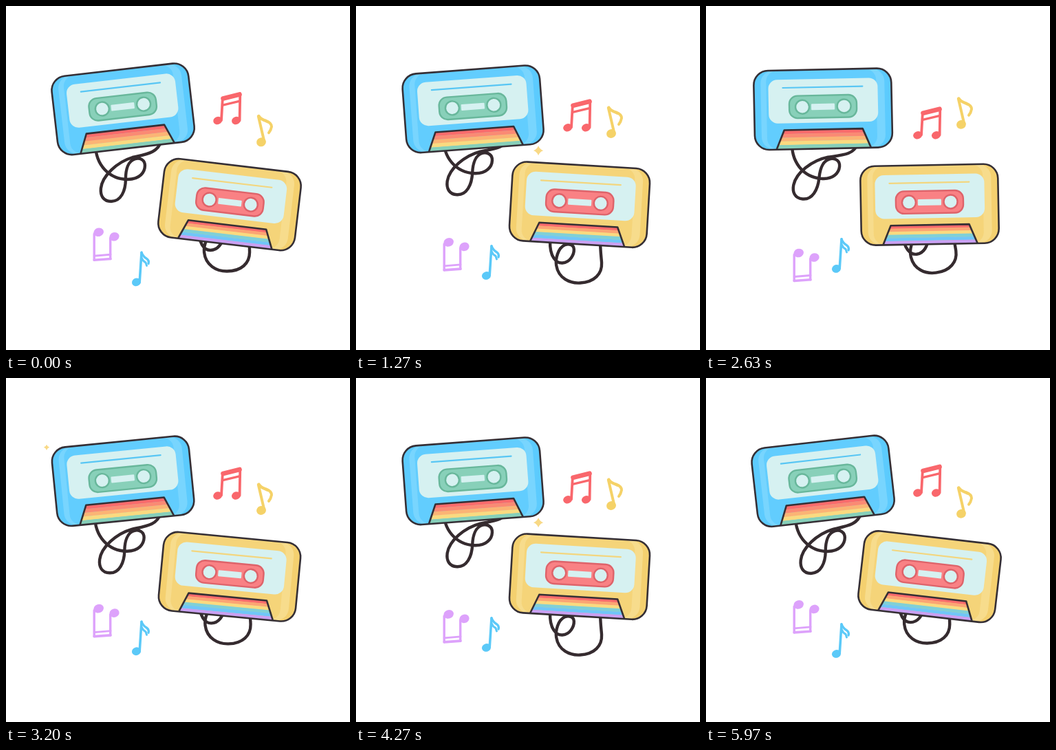
Write an HTML page that moves like this. It is 500x500 px and loops after 6010 ms.

```html
<!DOCTYPE html>
<html lang="en">
<head>
<meta charset="utf-8">
<title>Cassettes</title>
<style>
  html, body { margin: 0; width: 100%; height: 100%; overflow: hidden; background: #fff; }
  svg { display: block; width: 100vw; height: 100vh; }
  .tape { fill: none; stroke: #352b2f; stroke-width: 4.4; stroke-linecap: round; stroke-linejoin: round; }
  .edge { fill: none; stroke: #352f35; stroke-width: 2.6; stroke-linejoin: round; }
  .note { fill: none; stroke-linecap: round; stroke-linejoin: round; }
</style>
</head>
<body>
<svg viewBox="0 0 500 500">
  <g id="decks"></g>
  <g id="notes"></g>
  <g id="stars"></g>
</svg>
<script>
const LOOP = 6010, CYCLE = 3000, SWAY = 1500;
const $ = id => document.getElementById(id);

function add(parent, tag, attrs) {
  const el = document.createElementNS('http://www.w3.org/2000/svg', tag);
  for (const k in attrs) el.setAttribute(k, attrs[k]);
  parent.appendChild(el);
  return el;
}

const box = (g, x, y, width, height, rx, style) =>
  add(g, 'rect', { x, y, width, height, rx, ...style });

const decks = [
  {
    x: 170.1, y: 149.8, rest: -6.6, swing: 9.4, pull: -9.5,
    shell: '#5ccbfe', body: '#62cdfe', glow: '#78d5fe', line: '#58c6f4',
    reel: '#88d0b9', rim: '#68b79b',
    stripes: ['#f96b6c', '#fa8a74', '#fbb475', '#fada80', '#86cfb9'],
    tape: 'M130 200C130 232 151 252 177 252C195 252 202 241 202 232C202 224 195 220 188 222' +
      'C177 225 174 239 174 251C174 269 167 284 153 284C141 284 137 275 138 265' +
      'C140 247 161 227 184 220C205 215 221 213 225 197'
  },
  {
    x: 325, y: 288.7, rest: 6.8, swing: -13.7, pull: 18,
    shell: '#f4d06f', body: '#f5d479', glow: '#f7dc8c', line: '#f3d67e',
    reel: '#f98184', rim: '#de636a',
    stripes: ['#f96b6c', '#fba574', '#fada80', '#80d0d6', '#70c6f8', '#c9a0f2'],
    tape: 'M281 322C279 345 288 355 297 355C308 355 315 344 315 336C315 329 308 327 302 329' +
      'C292 333 287 348 288 358C290 377 306 385.5 321 385.5C342 385.5 354 374 354 358C354 350 353 345 354 320'
  }
];

function buildDeck(d) {
  d.el = add($('decks'), 'g', {});
  d.tapeEl = add(d.el, 'g', {});
  add(d.tapeEl, 'path', {
    class: 'tape', d: d.tape,
    transform: `rotate(${-d.rest}) translate(${-d.x} ${-d.y})`
  });

  const g = d.el, pale = '#d6f1f1';
  box(g, -100, -57.5, 200, 115, 21, { fill: d.shell });
  box(g, -90, -57, 180, 114, 18, { fill: d.glow });
  box(g, -82, -57, 160, 114, 16, { fill: d.body });
  box(g, -79, -44, 159, 63.5, 13, { fill: pale });
  add(g, 'path', { d: 'M-58-32H58', stroke: d.line, 'stroke-width': 2.2, 'stroke-linecap': 'round' });

  const rim = { stroke: d.rim, 'stroke-width': 2.4 };
  box(g, -49, -20, 98, 32.5, 12, { fill: d.reel, ...rim });
  box(g, -17, -8, 34, 9, 1, { fill: pale });
  for (const cx of [-30, 30.6]) add(g, 'circle', { cx, cy: -3.7, r: 10, fill: pale, ...rim });

  // Rainbow stripes follow the slanted sides of the trapezoid.
  const top = 29.5, deep = 27, half = f => 57 + 11 * f, n = d.stripes.length;
  d.stripes.forEach((fill, i) => {
    const a = i / n, b = (i + 1) / n;
    add(g, 'path', {
      fill,
      d: `M${-half(a)} ${top + deep * a}H${half(a)}L${half(b)} ${top + deep * b + .3}H${-half(b)}Z`
    });
  });
  add(g, 'path', { class: 'edge', d: `M-68.5 57L-57 ${top}H57L68.5 57` });
  box(g, -100, -57.5, 200, 115, 21, { class: 'edge' });
}

// Heads are [x, y, rx, ry]; lines are [path, width].
const notes = [
  { color: '#f9676c', move: 38.7,
    heads: [[307.7, 166.3, 6.6, 5.6], [334.5, 166.3, 6.6, 5.6]],
    lines: [['M314.8 135L313 166M340.3 127L339.6 166', 3.8],
      ['M315.5 134.3L339.5 128.3', 6.6], ['M315 144L340 138', 3.4]] },
  { color: '#f5d268', move: -46.4,
    heads: [[371, 198, 7, 6.4]],
    lines: [['M366.8 160.5L375.3 197', 4],
      ['M367.5 160Q371 165.5 378 167Q386 170 386 175.5Q385 181 382 184.5', 4],
      ['M369 163L380 168.5', 4]] },
  { color: '#dda2fb', move: 55,
    heads: [[134.7, 328.5, 7.4, 6.2], [157.5, 335, 7.2, 6.2]],
    lines: [['M128.2 331V369M151.7 337V367.3', 3.4],
      ['M128.2 369L152 367.3', 3.6], ['M128.2 363L152 361', 2.8]] },
  { color: '#5bc9f8', move: -35.4,
    heads: [[189.5, 401.5, 6.6, 5.8]],
    lines: [['M197 358.5L194.2 401', 3.6],
      ['M197 358.5Q199 364 204 367Q208.5 370 207 374.5', 3.4],
      ['M197 366Q199 371 203 373L204.5 377.5', 3]] }
];

function buildNote(n) {
  n.el = add($('notes'), 'g', {});
  for (const [cx, cy, rx, ry] of n.heads)
    add(n.el, 'ellipse', { cx, cy, rx, ry, fill: n.color, transform: `rotate(-18 ${cx} ${cy})` });
  for (const [d, width] of n.lines)
    add(n.el, 'path', { class: 'note', d, stroke: n.color, 'stroke-width': width });
}

// Each sparkle drifts up and to the right while it swells and fades to nothing.
const LIFE = 830, GOLD = '#f8d986', PEACH = '#fba878';
const stars = [
  { start: 110, x: 57.5, y: 103.5, dx: 14, dy: -25, color: GOLD },
  { start: 1340, x: 57.5, y: 103, dx: 14, dy: -21, color: GOLD },
  { start: 606, x: 252.4, y: 231, dx: 15.8, dy: -26, color: GOLD },
  { start: 1780, x: 252.4, y: 231, dx: 15.8, dy: -26, color: GOLD },
  { start: 300, x: 429.6, y: 346, dx: 14, dy: -22, color: PEACH },
  { start: 1715, x: 426, y: 346, dx: 14, dy: -22, color: PEACH }
];

function buildStar(s) {
  s.el = add($('stars'), 'path', {
    fill: s.color,
    d: 'M0-1Q.25-.25 1 0Q.25 .25 0 1Q-.25 .25-1 0Q-.25-.25 0-1Z'
  });
}

const mod = (a, n) => ((a % n) + n) % n;
const wave = t => (1 - Math.cos(2 * Math.PI * t)) / 2;

function quadSway(t) {
  const u = 1 - Math.abs(1 - 2 * mod(t, 1));
  return u < .5 ? 2 * u * u : 1 - 2 * (1 - u) ** 2;
}

function draw(now) {
  const t = mod(now, LOOP) % CYCLE;
  const tilt = quadSway((t - 35) / SWAY);
  const lift = wave((t - 32) / SWAY);
  const slide = wave(t / CYCLE);

  for (const d of decks) {
    d.el.setAttribute('transform', `translate(${d.x} ${d.y}) rotate(${d.rest + d.swing * tilt})`);
    d.tapeEl.setAttribute('transform', `translate(0 ${d.pull * slide})`);
  }
  for (const n of notes) n.el.setAttribute('transform', `translate(0 ${n.move * lift})`);
  for (const s of stars) {
    const p = (t - s.start) / LIFE;
    const on = p > 0 && p < 1;
    s.el.setAttribute('visibility', on ? 'visible' : 'hidden');
    if (on) s.el.setAttribute('transform',
      `translate(${s.x + s.dx * p} ${s.y + s.dy * p}) scale(${12.2 * Math.sin(Math.PI * p)})`);
  }
}

decks.forEach(buildDeck);
notes.forEach(buildNote);
stars.forEach(buildStar);

const begin = performance.now();
function tick() {
  draw(performance.now() - begin);
  requestAnimationFrame(tick);
}
tick();
</script>
</body>
</html>
```
